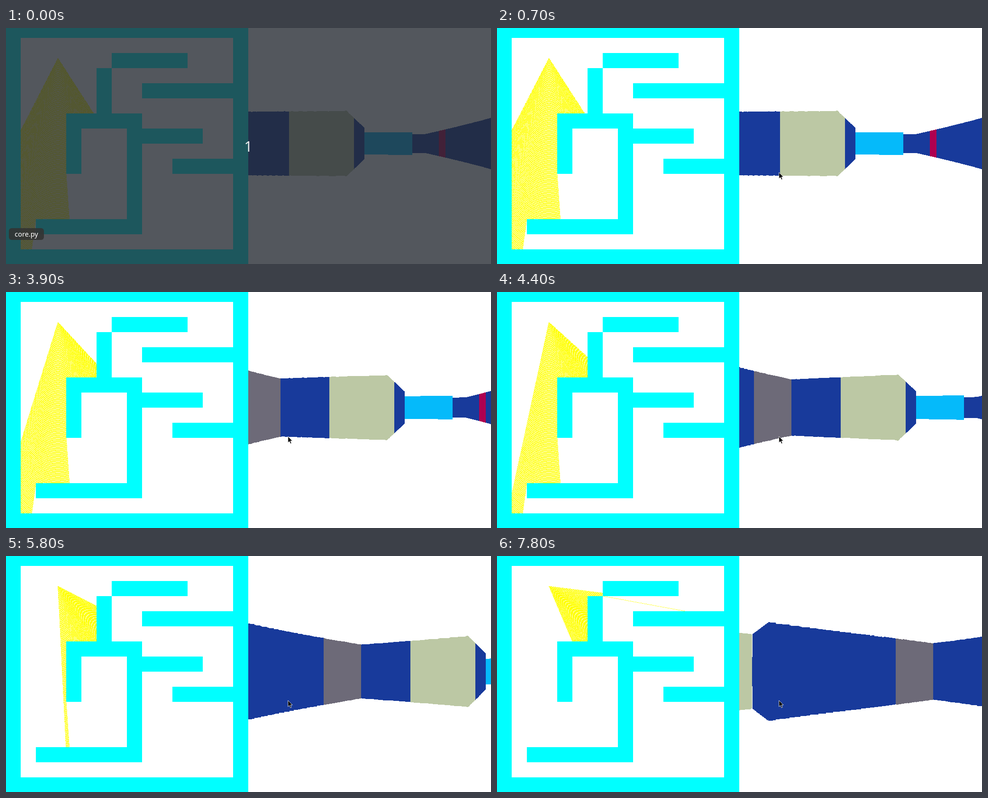
Recreate the animation shown at these times as an HTML page with a canvas. Size 1023 by 500 pixels, loop 8000 ms.

```html
<!DOCTYPE html>
<html lang="en">
<head>
<meta charset="utf-8">
<title>Ray casting maze</title>
<style>
  html, body { margin: 0; width: 100%; height: 100%; overflow: hidden; background: #fff; }
  canvas, #dim, #count, #label, #cursor { position: absolute; left: 0; top: 0; }
  canvas { display: block; }
  #dim { width: 1023px; height: 500px; background: rgba(38, 42, 50, .79); }
  #count { left: 491px; top: 230px; width: 40px; text-align: center; color: #e8eaec;
    font: 30px/42px "Noto Sans", sans-serif; }
  #label { left: 6px; top: 424px; width: 74px; height: 25px; border-radius: 6px; text-align: center;
    color: #fff; background: rgba(51, 51, 51, .88); font: 14.5px/25px "Noto Sans", sans-serif; }
  #cursor { left: 594px; top: 305px; }
</style>
</head>
<body>
<canvas id="view" width="1023" height="500"></canvas>
<div id="dim"></div>
<div id="count">1</div>
<div id="label">core.py</div>
<svg id="cursor" width="12" height="18"><path d="M.8 1V14.2L3.8 11.5 6 16.4 8.2 15.4 6 10.7H10.2Z" fill="#000" stroke="#fff" stroke-width=".8"/></svg>
<script>
const MAP = [
  '0000222222220000',
  '1              0',
  '1      11111   0',
  '1     0        0',
  '0     0  1110000',
  '0     3        0',
  '0   10000      0',
  '0   0   11100  0',
  '0   0   0      0',
  '0   0   1  00000',
  '0       1      0',
  '2       1      0',
  '0       0      0',
  '0 4444444      0',
  '0              0',
  '0002222222200000'
];
const COLORS = ['#183a9b', '#bcc8a4', '#af0050', '#6d6a78', '#05bafa'];
const TILE = 32, SIZE = 512, FOV = Math.PI / 3, STEP = 0.05, LOOP = 8000;
const player = { x: 3.456, y: 2.345, angle: 1.523 };
// Each entry turns the player 5 degrees; two turns land together at 5800.
const TURNS = [2800, 3900, 4400, 5200, 5800, 5800, 6100, 6700, 7200, 7800];

const $ = id => document.getElementById(id);
const ctx = $('view').getContext('2d');
ctx.translate(-1, -11);

function rect(color, x, y, w, h) {
  ctx.fillStyle = color;
  ctx.fillRect(x, y, w, h);
}

function castRay(column, heading) {
  const angle = heading - FOV / 2 + FOV * column / SIZE;
  const dx = Math.cos(angle), dy = Math.sin(angle);
  for (let k = 0; k < 400; k++) {
    const t = k * STEP, x = player.x + t * dx, y = player.y + t * dy;
    const cell = MAP[Math.floor(y)][Math.floor(x)];
    if (cell !== ' ') {
      const height = Math.floor(SIZE / (t * Math.cos(angle - heading)));
      rect(COLORS[cell], SIZE + column, Math.floor((SIZE - height) / 2), 1, height);
      return;
    }
    rect('#ff0', Math.floor(x * TILE), Math.floor(y * TILE), 1, 1);
  }
}

function drawScene(turns) {
  rect('#fff', 0, 0, SIZE * 2, SIZE);
  MAP.forEach((row, j) => [...row].forEach((cell, i) => {
    if (cell !== ' ') rect('#0ff', i * TILE, j * TILE, TILE, TILE);
  }));
  const heading = player.angle - turns * Math.PI / 36;
  for (let column = 0; column < SIZE; column++) castRay(column, heading);
}

let drawn = -1;
function render(now) {
  const t = now % LOOP;
  const turns = TURNS.filter(time => t >= time).length;
  if (turns !== drawn) drawScene(drawn = turns);
  $('dim').style.opacity = $('count').style.opacity = t < 200 ? 1 : 0;
  $('label').style.opacity = t < 600 ? 1 : t < 700 ? 0.5 : 0;
  $('cursor').style.opacity = t < 700 ? 0 : 1;
}

const start = performance.now();
function tick() {
  render(performance.now() - start);
  requestAnimationFrame(tick);
}
tick();
</script>
</body>
</html>
```
